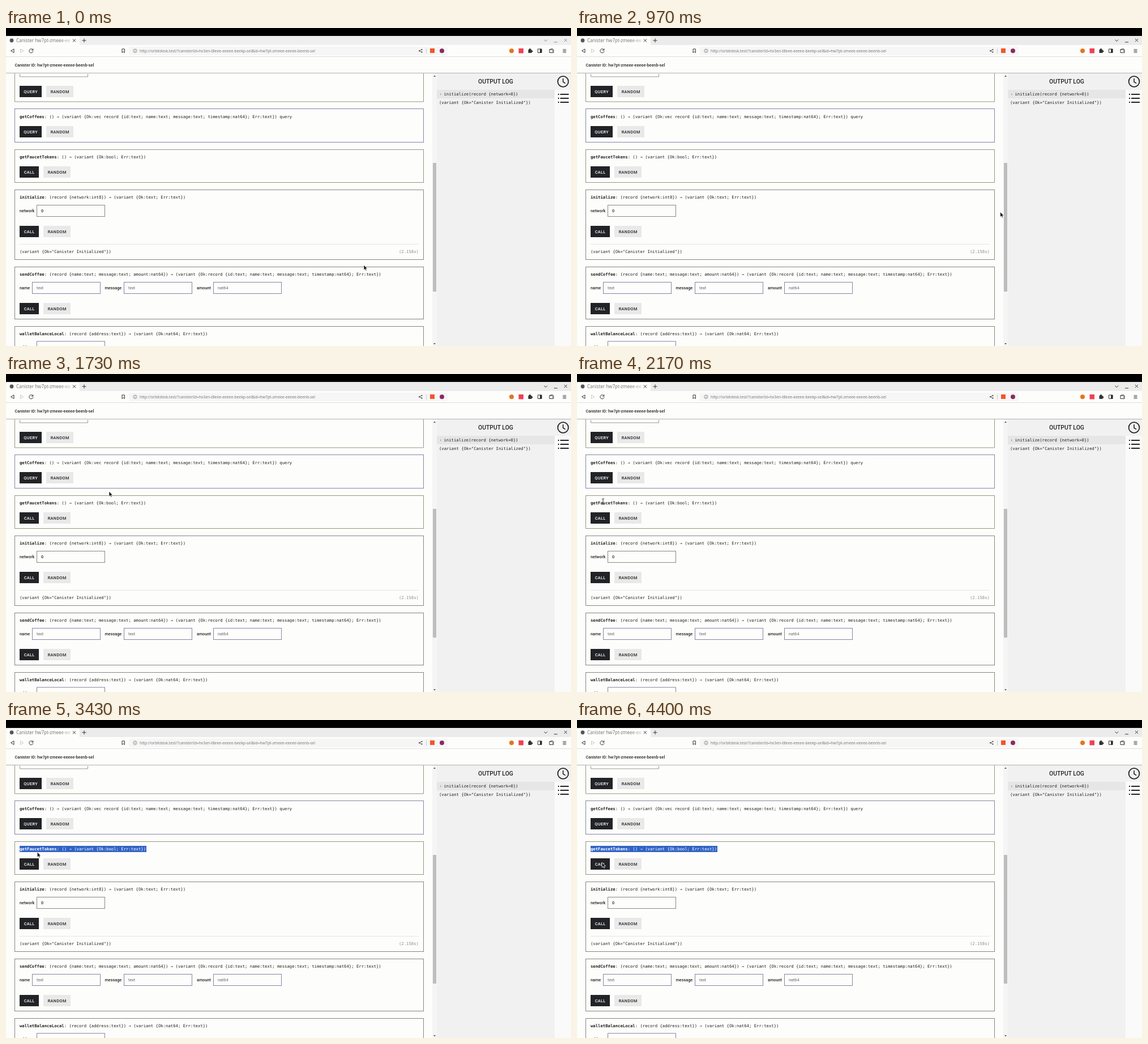
An HTML page for the animation above (8000 ms loop, 998 by 561 pixels).

```html
<!DOCTYPE html>
<html lang="en">
<head>
<meta charset="utf-8">
<title>Canister console</title>
<style>
html, body { margin: 0; width: 100%; height: 100%; overflow: hidden; background: #fdfdfc; }
svg { display: block; width: 100%; height: 100%; }
text { white-space: pre; }
.mono { font: 7.28px "DejaVu Sans Mono", monospace; fill: #222; }
.mono .name { font-weight: 700; }
.ui { font: 500 7.28px Roboto, sans-serif; fill: #222; }
.hint { font-weight: 400; fill: #666; }
.btn { letter-spacing: .4px; text-anchor: middle; }
.bar { font-family: "Noto Sans", sans-serif; }
.line { fill: none; stroke: #333; stroke-width: 1; }
</style>
</head>
<body>
<svg id="stage" viewBox="0 0 998 561" preserveAspectRatio="none"></svg>
<script>
const LOOP = 8000;
const ID = "hw7pt-zmeee-eeeee-beenb-sel";
const URL_TEXT = `http://orbitdesk.test/?canisterId=hv3en-t8eee-eeeee-beekp-sel&id=${ID}`;
const stage = document.getElementById("stage");

const rect = (x, y, w, h, fill, more = "") =>
  `<rect x="${x}" y="${y}" width="${w}" height="${h}" fill="${fill}" ${more}/>`;
const text = (x, y, s, cls, more = "") =>
  `<text x="${x}" y="${y}" class="${cls}" ${more}>${s}</text>`;
const path = (d, more = "") => `<path d="${d}" class="line" ${more}/>`;
const dot = (x, y, r, fill) => `<circle cx="${x}" cy="${y}" r="${r}" fill="${fill}"/>`;
const frame = (x, y, w, h, stroke) =>
  rect(x + .5, y + .5, w, h, "none", `stroke="${stroke}"`);

const OLIVE = "#96967f", BLUE = "#8585a2", GREY = "#858585";

const button = (x, y, w, label, dark) =>
  rect(x, y, w, 20, dark ? "#222327" : "#e9e9e9") +
  text(x + w / 2 + .2, y + 12.7, label, "ui btn", dark ? 'style="fill:#fff"' : "");

function buttons(y, label) {
  const w = label === "QUERY" ? 39 : 34;
  return button(24, y, w, label, true) + button(32 + w, y, 48, "RANDOM", false);
}

const card = (y, h, stroke) => frame(15, y, 722, h, stroke);

const signature = (y, name, type, id = "") =>
  text(24, y, `<tspan class="name">${name}</tspan>: ${type}`, "mono", id);

function field(x, y, label, boxX, value, stroke, hint = true) {
  return text(x, y + 13.2, label, "ui") + frame(boxX, y, 120, 20, stroke) +
    text(boxX + 8, y + 13.2, value, hint ? "ui hint" : "ui");
}

function browser() {
  return rect(0, 14, 998, 16, "#efefef", 'id="strip"') +
    rect(0, 15, 130, 16, "#fdfdfc", 'rx="3"') +
    dot(10, 22, 3.4, "#555") +
    text(18, 24.8, `Canister ${ID.slice(0, 14)}`, "bar", 'font-size="8" fill="url(#fade)"') +
    path("M118 19.5l5 5m0 -5l-5 5", 'stroke-width=".9"') +
    path("M134.5 22h7M138 18.5v7") +
    `<g id="controls">${path("M950.5 20.5l2.8 3l2.8 -3M968 25h6M986 19l5 5m0 -5l-5 5")}</g>` +
    rect(0, 30, 998, 20, "#fdfdfc") +
    rect(217, 33, 563, 15, "#f6f6f6", 'rx="3"') +
    path("M14 37v6.4l-5.4 -3.2z") +
    path("M25.5 37v6.4l5.4 -3.2z", 'style="stroke:#c9c9c9"') +
    path("M47.2 38.2a3.5 3.5 0 1 0 .7 2.6M47.9 36.4v2.8h-2.8") +
    path("M205 37h4.4v6.6l-2.2 -2l-2.2 2z") +
    `<circle cx="228" cy="40.3" r="3.2" class="line" style="stroke:#777;stroke-width:.8"/>` +
    path("M228 39.8v2.2M228 38.2v.7", 'style="stroke:#777"') +
    text(236, 42.9, URL_TEXT.replace("&", "&amp;"), "bar", 'font-size="6.75" fill="#777"') +
    path("M734.5 38l-4.5 2.3l4.5 2.3", 'style="stroke-width:.8"') +
    dot(734.5, 38, 1.1, "#444") + dot(734.5, 42.6, 1.1, "#444") + dot(730, 40.3, 1.1, "#444") +
    path("M742.5 36v9", 'style="stroke:#ccc"') +
    rect(749, 36, 8, 8, "#f1562b") + dot(770, 40.3, 4, "#8c2a63") +
    dot(893, 40.3, 4, "#e2761b") + rect(905.5, 36, 8.5, 8.5, "#ef4156") +
    rect(922.5, 38, 6, 6, "#333") + dot(925.5, 37.6, 1.6, "#333") + dot(929, 41, 1.5, "#333") +
    path("M939.5 37h6.5v6.5h-6.5z") + rect(943, 37, 3.5, 6.5, "#333") +
    path("M960 38h7v5.5h-7zM960 38l5.5 -1.5M964.5 40.8h2.5") +
    path("M983.5 38h6M983.5 40.5h6M983.5 43h6") +
    rect(0, 50, 998, 1, "#dedede");
}

function page() {
  return text(15.5, 67.8, `Canister ID: ${ID}`, "ui") +
    path("M24.5 81v5h120v-5", `style="stroke:#999"`) +
    path("M15.5 80v50h722v-50", `style="stroke:${OLIVE}"`) +
    buttons(102, "QUERY") +
    card(142, 59, BLUE) +
    signature(159, "getCoffees", "() → (variant {Ok:vec record {id:text; name:text; message:text; timestamp:nat64}; Err:text}) query") +
    buttons(173, "QUERY") +
    card(214, 58, OLIVE) +
    rect(24, 222, 224, 11, "#3163c5", 'id="mark"') +
    signature(230, "getFaucetTokens", "() → (variant {Ok:bool; Err:text})", 'id="picked"') +
    buttons(244, "CALL") +
    card(285, 123, GREY) +
    signature(301, "initialize", "(record {network:int8}) → (variant {Ok:text; Err:text})") +
    field(24, 312, "network", 54, "0", "#888", false) +
    buttons(349, "CALL") +
    path("M24 381.5h705", 'style="stroke:#e6e6e6"') +
    text(24, 397.2, '(variant {Ok="Canister Initialized"})', "mono") +
    text(694, 397.2, "(2.158s)", "mono", 'style="fill:#8a8a8a"') +
    card(421, 92, GREY) +
    signature(437, "sendCoffee", "(record {name:text; message:text; amount:nat64}) → (variant {Ok:record {id:text; name:text; message:text; timestamp:nat64}; Err:text})") +
    field(24, 448, "name", 46, "text", BLUE) +
    field(174.5, 448, "message", 208, "text", BLUE) +
    field(337, 448, "amount", 366, "nat64", BLUE) +
    buttons(485, "CALL") +
    card(526, 60, GREY) +
    signature(541.5, "walletBalanceLocal", "(record {address:text}) → (variant {Ok:nat64; Err:text})") +
    field(24, 552.3, "address", 54, "text", BLUE);
}

function sidebar() {
  const list = [117, 124, 131].map(y =>
    rect(975, y - 1, 2, 2, "#222") + rect(979, y - 1, 15, 2, "#222")).join("");
  return rect(753, 80, 8, 481, "#f5f5f5") + rect(754, 238, 6, 227, "#bdbdbd") +
    `<path d="M755 86l2 -2.5l2 2.5zM755 556l2 2.5l2 -2.5z" fill="#555"/>` +
    rect(761, 80, 208, 481, "#f1f1f1") + rect(969, 80, 29, 481, "#fafafa") +
    rect(969, 80, 29, 29, "#f1f1f1") + rect(761, 109, 208, 15, "#e6e6e6") +
    text(865, 98, "OUTPUT LOG", "ui", 'style="font-size:10.4px;text-anchor:middle"') +
    text(765.5, 119, "›", "mono", 'style="fill:#666"') +
    text(773.5, 119, "initialize(record {network=0})", "mono") +
    text(765, 134, '(variant {Ok="Canister Initialized"})', "mono") +
    `<circle cx="984" cy="94.5" r="9.4" class="line" style="stroke:#222;stroke-width:1.8"/>` +
    path("M984 89v6l4 2.7", 'style="stroke:#222;stroke-width:1.6"') + list;
}

stage.innerHTML =
  `<defs><linearGradient id="fade" gradientUnits="userSpaceOnUse" x1="18" x2="116">
    <stop offset=".78" stop-color="#777"/><stop offset="1" stop-color="#777" stop-opacity=".25"/>
  </linearGradient></defs>` +
  rect(0, 0, 998, 561, "#fdfdfc") + browser() + page() + sidebar() +
  rect(0, 79, 998, 1, "#b0b0b0") + rect(0, 0, 998, 14, "#000") +
  `<g id="pointer">
    <path id="arrow" d="M0 0v9.2l2.1 -1.9l1.5 3l1.5 -.7l-1.4 -2.9h2.7z" fill="#111" stroke="#fff" stroke-width=".7"/>
    <path id="beam" d="M-2 -5h1.4l.6 .7l.6 -.7h1.4M0 -4.5v9M-2 5h1.4l.6 -.7l.6 .7h1.4" class="line"/>
  </g>`;

const [strip, controls, mark, picked, pointer, arrow, beam] =
  ["strip", "controls", "mark", "picked", "pointer", "arrow", "beam"].map(id => document.getElementById(id));
const pickedName = picked.querySelector("tspan");

// time, x, y of the pointer
const MOVES = [
  [30, 632, 418], [530, 729, 331], [830, 748, 325], [930, 748, 325], [1070, 746, 322],
  [1730, 182, 207], [1770, 182, 207], [1830, 188, 200], [2030, 46, 225], [2170, 46, 225],
  [2300, 55, 226], [2500, 55, 226], [2530, 56, 227], [3370, 56, 227], [3550, 53, 249],
  [3750, 90, 238], [3970, 72, 222], [4170, 66, 226], [4400, 44, 251]
];

function pointerAt(t) {
  const i = MOVES.findIndex(m => m[0] > t);
  if (i === 0) return MOVES[0].slice(1);
  if (i < 0) return MOVES[MOVES.length - 1].slice(1);
  const [t0, x0, y0] = MOVES[i - 1], [t1, x1, y1] = MOVES[i];
  const u = (t - t0) / (t1 - t0), e = u * u * (3 - 2 * u);
  return [x0 + (x1 - x0) * e, y0 + (y1 - y0) * e];
}

function draw(t) {
  const active = t >= 930, word = t >= 2970, line = t >= 3060;
  const typing = t >= 2030 && t < 3400;
  const [x, y] = pointerAt(t);
  strip.setAttribute("fill", active ? "#ebebeb" : "#efefef");
  controls.setAttribute("opacity", active ? 1 : .5);
  mark.setAttribute("width", line ? 224 : word ? 66 : 0);
  picked.style.fill = line ? "#fff" : "";
  pickedName.style.fill = word ? "#fff" : "";
  pointer.setAttribute("transform", `translate(${x.toFixed(2)} ${y.toFixed(2)})`);
  arrow.setAttribute("visibility", typing ? "hidden" : "visible");
  beam.setAttribute("visibility", typing ? "visible" : "hidden");
}

const start = performance.now();
function tick() {
  draw((performance.now() - start) % LOOP);
  requestAnimationFrame(tick);
}
tick();
</script>
</body>
</html>
```
